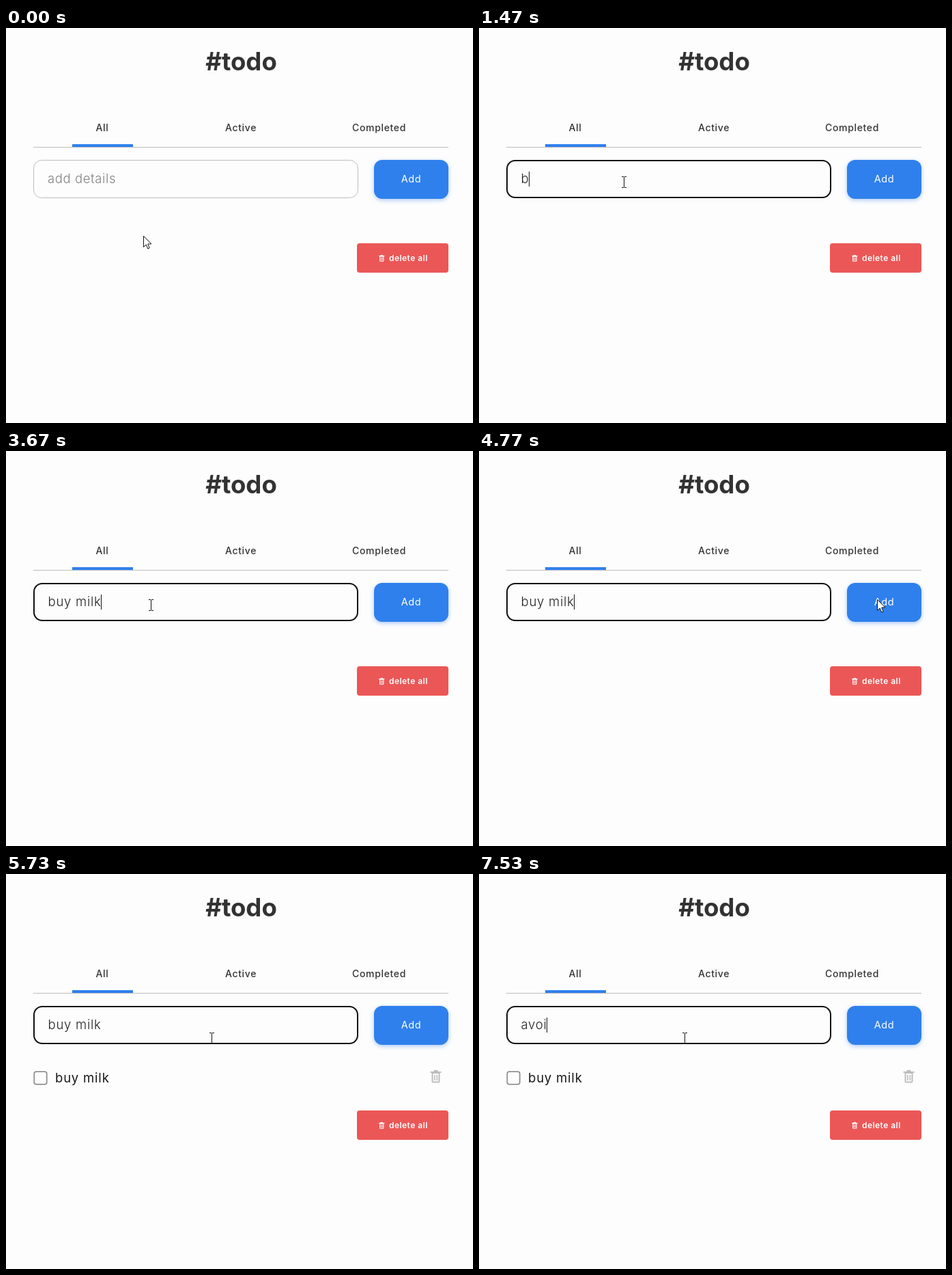
Recreate the animation shown at these times as an HTML page with a canvas. Size 684 px wide and 578 px high, loop 8000 ms.

```html
<!DOCTYPE html>
<html lang="en">
<head>
<meta charset="utf-8">
<title>Todo list</title>
<style>
  html, body { margin: 0; width: 100%; height: 100%; overflow: hidden; background: #fdfdfd; }
  canvas { display: block; }
</style>
</head>
<body>
<canvas id="stage" width="684" height="578"></canvas>
<script>
const ctx = document.getElementById('stage').getContext('2d');
const LOOP = 8000, BLINK = 530, FOCUS_AT = 600, ADD_AT = 5000;
const INK = '#333', BLUE = '#2f80ed', RED = '#eb5757', PAPER = '#fdfdfd', GREY = '#bdbdbd';

// [time, field content, caret stays hidden]
const edits = [
  [FOCUS_AT, ''], [1470, 'b'], [1650, 'bu'], [2170, 'buy'], [2310, 'buy '],
  [2890, 'buy m'], [3080, 'buy mi'], [3310, 'buy mil'], [3670, 'buy milk'],
  [5260, 'buy milk', true],
  [5970, 'buy mi'], [6000, 'buy m'], [6030, 'buy'], [6070, 'bu'], [6100, 'b'],
  [6330, 'a'], [7085, 'av'], [7430, 'avo'], [7520, 'avoi']
];

// [time, x, y] of the pointer
const path = [
  [0, 201, 304], [30, 201, 304], [530, 212, 225], [4200, 212, 225], [4530, 591, 220],
  [4700, 591, 220], [4770, 583, 217], [5000, 584, 219], [5170, 597, 230],
  [5300, 600, 235], [5730, 301, 240], [LOOP, 301, 240]
];

const smooth = u => u * u * (3 - 2 * u);

function pointerAt(t) {
  const i = path.findIndex(p => p[0] > t);
  const [t0, x0, y0] = path[i - 1], [t1, x1, y1] = path[i];
  const u = smooth((t - t0) / (t1 - t0));
  return [x0 + (x1 - x0) * u, y0 + (y1 - y0) * u];
}

function text(str, x, y, size, weight, color, spacing = 0, align = 'left') {
  ctx.font = `${weight} ${size}px Inter, sans-serif`;
  ctx.letterSpacing = spacing + 'px';
  ctx.textAlign = align;
  ctx.fillStyle = color;
  ctx.fillText(str, x, y);
  return ctx.measureText(str).width;
}

function rect(x, y, w, h, color) {
  ctx.fillStyle = color;
  ctx.fillRect(x, y, w, h);
}

function box(x, y, w, h, radius, fill, stroke, line = 1) {
  ctx.beginPath();
  ctx.roundRect(x, y, w, h, radius);
  if (fill) { ctx.fillStyle = fill; ctx.fill(); }
  if (stroke) { ctx.strokeStyle = stroke; ctx.lineWidth = line; ctx.stroke(); }
}

function trash(x, y, scale, color) {
  ctx.save();
  ctx.translate(x, y);
  ctx.scale(scale, scale);
  rect(0, 2, 16, 2, color);
  rect(5, 0, 6, 2, color);
  box(3, 4, 10, 13.5, 1, null, color, 2);
  rect(5.5, 7, 1.6, 8, color);
  rect(9, 7, 1.6, 8, color);
  ctx.restore();
}

function arrow(x, y) {
  ctx.save();
  ctx.translate(x + .5, y + .5);
  ctx.beginPath();
  [[0, 0], [0, 16], [3.7, 12.5], [6.3, 18.5], [8.7, 17.4], [6.2, 11.6], [11.4, 11.4]]
    .forEach(p => ctx.lineTo(...p));
  ctx.closePath();
  ctx.fillStyle = '#fff';
  ctx.strokeStyle = '#111';
  ctx.lineWidth = 1;
  ctx.fill();
  ctx.stroke();
  ctx.restore();
}

function beam(x, y) {
  rect(x, y - 7, 1, 15, '#111');
  for (const end of [y - 8, y + 8]) {
    rect(x - 3, end, 3, 1, '#111');
    rect(x + 1, end, 3, 1, '#111');
  }
}

function field(t) {
  const focused = t >= FOCUS_AT;
  if (focused) box(41, 194, 474, 54, 12, PAPER, '#101010', 2);
  else box(40.5, 193.5, 475, 55, 12, PAPER, GREY);

  const [since, value, hidden] = edits.findLast(e => e[0] <= t) || [0, ''];
  if (!value) text('add details', 61, 227, 18.5, 300, '#828282', .6);
  const width = value ? text(value, 61.5, 227, 18.5, 300, '#222', .75) : 0;
  if (focused && !hidden && (t - since) % (2 * BLINK) < BLINK) {
    rect(Math.round(61 + width), 210, 1, 22, '#111');
  }
}

function addButton() {
  ctx.save();
  ctx.shadowColor = 'rgba(47, 128, 237, .4)';
  ctx.shadowBlur = 6;
  ctx.shadowOffsetY = 2;
  box(539, 193, 109, 57, 12, BLUE);
  ctx.restore();
  text('Add', 593.5, 226, 14.5, 400, '#fff', .6, 'center');
}

function draw(t) {
  rect(0, 0, 684, 578, PAPER);
  text('#todo', 344.5, 62, 36.6, 700, INK, 0, 'center');

  [['All', 141], ['Active', 344], ['Completed', 546.5]].forEach(([name, x]) =>
    text(name, x, 151, 14, 500, INK, .65, 'center'));
  rect(40, 174, 608, 1, GREY);
  rect(97, 170, 89, 4, BLUE);

  field(t);
  addButton();

  const added = t >= ADD_AT;
  if (added) {
    box(41.25, 289.25, 18.5, 18.5, 3, null, '#828282', 1.5);
    text('buy milk', 72, 305, 18.5, 400, '#181818', .8);
    trash(621.5, 287, 1, GREY);
  }

  const top = added ? 346 : 315;
  box(514, top, 134, 43, 4, RED);
  trash(546, top + 17, .53, '#fff');
  text('delete all', 561, top + 26, 12, 600, '#fff', .45);

  const [x, y] = pointerAt(t).map(Math.round);
  const overField = x > 40 && x < 516 && y > 193 && y < 249;
  (overField ? beam : arrow)(x, y);
}

const start = performance.now();
function tick() {
  draw((performance.now() - start) % LOOP);
  requestAnimationFrame(tick);
}
tick();
</script>
</body>
</html>
```
